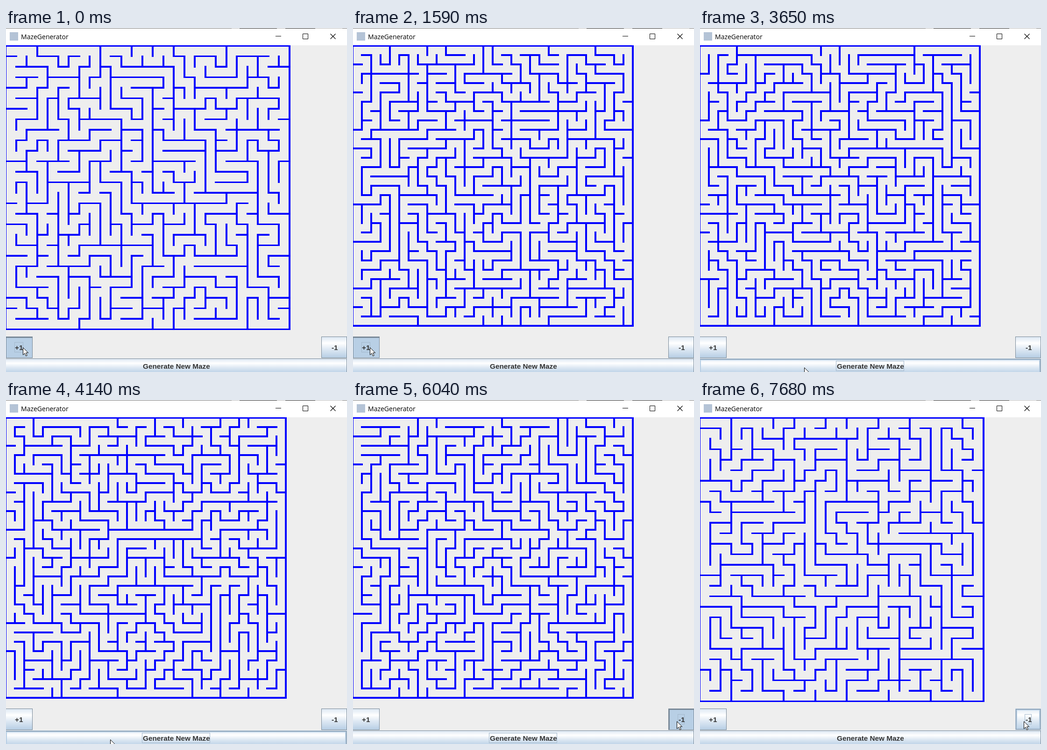
These frames come from a looping animation (730x737 px, 8 s). An HTML page with a canvas:

```html
<!DOCTYPE html>
<html lang="en">
<head>
<meta charset="utf-8">
<title>Maze</title>
<style>
html, body { margin: 0; width: 100%; height: 100%; overflow: hidden; background: #eee; }
#stage { position: relative; width: 730px; height: 737px; overflow: hidden; background: #eee; }
#stage > * { position: absolute; box-sizing: border-box; }
#bar { left: 0; top: 0; width: 730px; height: 37px; background: #fff; }
#title { left: 32px; top: 9px; font: 14px/19px "Open Sans", "Noto Sans", sans-serif; color: #000; white-space: nowrap; }
#maze { left: 0; top: 37px; }
.btn {
  border: 1px solid #7a8a99;
  background: linear-gradient(#dde8f3, #fff 30%, #dde8f3 60%, #b8cfe5);
}
.btn.hover {
  border: 0;
  box-shadow: inset 0 0 0 1px #b8cfe5, inset 0 0 0 2px #7a8a99, inset 0 0 0 4px #b8cfe5;
}
.btn.press { border: 1px solid #7a8a99; border-width: 3px 1px 1px 3px; background: #b8cfe5; box-shadow: none; }
#plus { left: -2px; top: 661px; width: 59px; height: 46px; }
#minus { left: 675px; top: 661px; width: 55px; height: 46px; }
#gen { left: -2px; top: 708px; width: 732px; height: 33px; }
.label { font: bold 15.3px/17px "Liberation Sans", Arial, sans-serif; color: #333; white-space: nowrap; }
.ring { border: 1px solid #a3b8cc; visibility: hidden; }
.ring.on { visibility: visible; }
</style>
</head>
<body>
<div id="stage">
  <div id="bar"></div>
  <svg width="730" height="37" style="left:0;top:0" fill="none" stroke="#000">
    <path d="M0 .5H730" stroke="#777"/>
    <path d="M483 .5h17M580 .5h18M662 .5h58" stroke="#bbb"/>
    <path d="M500 .5h80M598 .5h64" stroke="#222"/>
    <rect x="8" y="9" width="18" height="18" fill="#b4c3d6" stroke="none"/>
    <path d="M577 17.5h12M635.5 12.5h11v11h-11z"/>
    <path d="M694.5 12.5l11 11M705.5 12.5l-11 11" stroke-width="1.1"/>
  </svg>
  <div id="title">MazeGenerator</div>
  <canvas id="maze" width="730" height="624"></canvas>

  <div id="plus" class="btn"></div>
  <div id="minus" class="btn"></div>
  <div id="gen" class="btn"></div>
  <div class="ring" id="plusRing" style="left:18px;top:673px;width:19px;height:22px"></div>
  <div class="ring" id="minusRing" style="left:695px;top:673px;width:15px;height:22px"></div>
  <div class="ring" id="genRing" style="left:291px;top:713px;width:146px;height:22px"></div>
  <div class="label" style="left:19px;top:676px">+1</div>
  <div class="label" style="left:697px;top:676px">-1</div>
  <div class="label" style="left:293px;top:716px">Generate New Maze</div>

  <svg id="mouse" width="14" height="22" viewBox="0 0 14 22">
    <path d="M.5 .7V16.3L4.1 12.9L6.6 18.7L9.2 17.6L6.7 11.9H11.6Z" fill="#fff" stroke="#000"/>
  </svg>
</div>
<script>
const $ = id => document.getElementById(id);
const LOOP = 8000;
const names = ['plus', 'minus', 'gen'];

// Each step overrides part of the state; maze is [cells per side, seed].
const steps = [
  [0, { maze: [27, 11], hover: 'plus', press: 'plus', focus: 'plus', mouse: [36, 684], torn: false }],
  [120, { maze: [28, 12] }],
  [240, { press: '' }],
  [800, { press: 'plus' }],
  [920, { maze: [29, 13], torn: true }],
  [1060, { press: '', torn: false }],
  [1460, { press: 'plus' }],
  [1580, { maze: [30, 14] }],
  [1700, { press: '' }],
  [1830, { hover: 'gen', mouse: [92, 712] }],
  [1950, { mouse: [150, 728] }],
  [2070, { hover: '', mouse: null }],
  [2470, { hover: 'gen' }],
  [2620, { mouse: [223, 727] }],
  [2900, { press: 'gen', focus: 'plus gen' }],
  [3020, { maze: [30, 15], press: '', focus: 'gen' }],
  [3390, { press: 'gen' }],
  [3530, { maze: [30, 16] }],
  [3650, { press: '' }],
  [4020, { press: 'gen' }],
  [4140, { maze: [30, 17], press: '' }],
  [4420, { press: 'gen' }],
  [4560, { maze: [30, 18] }],
  [4710, { press: '' }],
  [4960, { mouse: null }],
  [5080, { hover: '' }],
  [5540, { hover: 'gen', mouse: [560, 727] }],
  [5660, { mouse: [632, 712] }],
  [5780, { hover: 'minus', mouse: [680, 696] }],
  [5900, { mouse: [693, 688] }],
  [6040, { press: 'minus', focus: 'gen minus' }],
  [6170, { maze: [29, 19], focus: 'minus' }],
  [6290, { press: '' }],
  [6820, { press: 'minus' }],
  [6940, { maze: [28, 20] }],
  [7060, { press: '' }],
  [7560, { press: 'minus' }],
  [7680, { maze: [27, 21], press: '' }]
];

function random(seed) {
  let s = seed * 7919;
  return () => {
    s = (s + 0x6d2b79f5) | 0;
    let r = Math.imul(s ^ (s >>> 15), 1 | s);
    r = (r + Math.imul(r ^ (r >>> 7), 61 | r)) ^ r;
    return ((r ^ (r >>> 14)) >>> 0) / 4294967296;
  };
}

// Depth-first carving; returns which cells are open to the right and below.
function carve(n, seed) {
  const rnd = random(seed);
  const seen = new Set(), right = new Set(), down = new Set();
  const path = [Math.floor(rnd() * n * n)];
  seen.add(path[0]);
  while (path.length) {
    const c = path[path.length - 1], x = c % n;
    const next = [];
    if (x > 0) next.push(c - 1);
    if (x < n - 1) next.push(c + 1);
    if (c >= n) next.push(c - n);
    if (c < n * n - n) next.push(c + n);
    const free = next.filter(k => !seen.has(k));
    if (!free.length) { path.pop(); continue; }
    const k = free[Math.floor(rnd() * free.length)];
    (Math.abs(k - c) === 1 ? right : down).add(Math.min(k, c));
    seen.add(k);
    path.push(k);
  }
  return { right, down };
}

const ctx = $('maze').getContext('2d');

function drawMaze([n, seed], torn) {
  const { right, down } = carve(n, seed);
  const pitch = Math.floor(500 / n) * 1.25;
  const wall = (i, j, i2, j2) => {
    const x = Math.round(i * pitch - 2.6), y = Math.round(j * pitch - 0.875);
    ctx.fillRect(x, y, Math.round(i2 * pitch + 1.15) - x, Math.round(j2 * pitch + 2.875) - y);
  };
  ctx.clearRect(0, 0, 730, 624);
  ctx.save();
  if (torn) {
    ctx.beginPath();
    ctx.rect(0, 0, 554, 624);
    ctx.rect(554, 0, 21, 129);
    ctx.clip();
  }
  ctx.fillStyle = '#00f';
  wall(0, 0, n, 0);
  wall(0, 0, 0, n);
  wall(n, 0, n, n);
  wall(0, n, n, n);
  for (let j = 0; j < n; j++) {
    for (let i = 0; i < n; i++) {
      const c = j * n + i;
      if (i < n - 1 && !right.has(c)) wall(i + 1, j, i + 1, j + 1);
      if (j < n - 1 && !down.has(c)) wall(i, j + 1, i + 1, j + 1);
    }
  }
  ctx.restore();
}

let shown = -1, drawn = '';

function show(index) {
  const s = Object.assign({}, ...steps.slice(0, index + 1).map(step => step[1]));
  for (const name of names) {
    $(name).classList.toggle('hover', s.hover === name);
    $(name).classList.toggle('press', s.press === name);
    $(name + 'Ring').classList.toggle('on', s.focus.split(' ').includes(name));
  }
  $('mouse').style.display = s.mouse ? '' : 'none';
  if (s.mouse) {
    $('mouse').style.left = s.mouse[0] + 'px';
    $('mouse').style.top = s.mouse[1] + 'px';
  }
  const key = s.maze + ' ' + s.torn;
  if (key !== drawn) drawMaze(s.maze, s.torn);
  drawn = key;
}

const start = performance.now();

function tick() {
  const t = (performance.now() - start) % LOOP;
  let index = steps.length - 1;
  while (steps[index][0] > t) index--;
  if (index !== shown) show(shown = index);
  requestAnimationFrame(tick);
}
tick();
</script>
</body>
</html>
```
